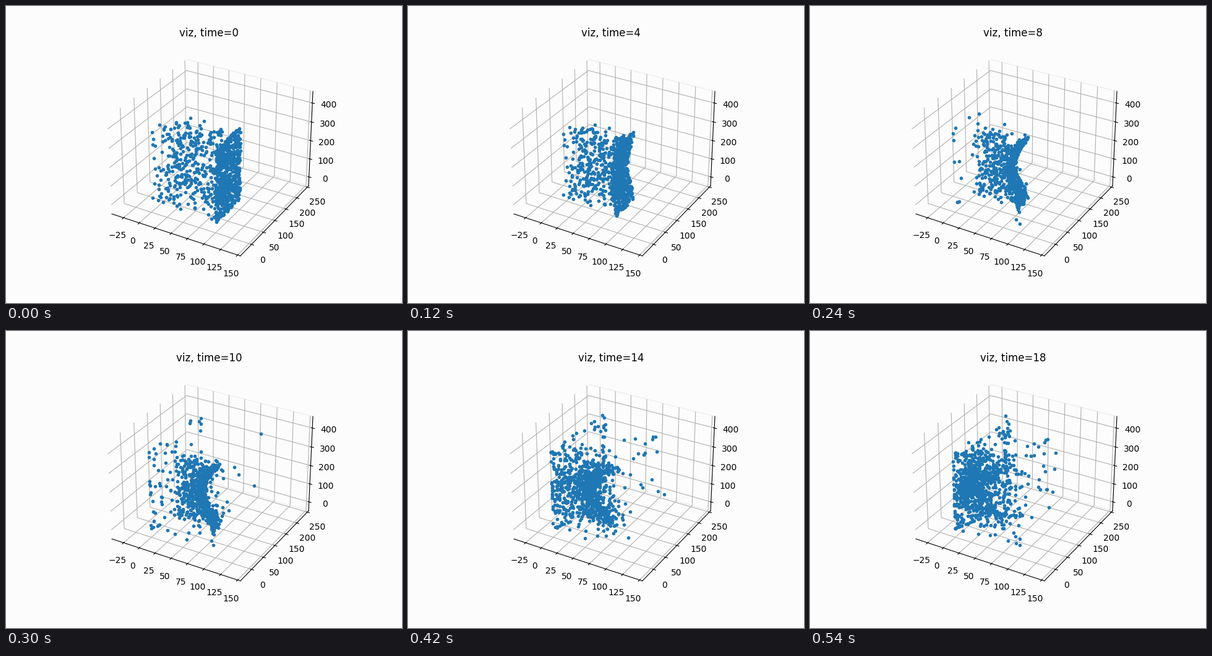
A matplotlib script that plays this animation: 640 by 480 pixels, repeating every 0.57 s.

```python
import numpy as np
import matplotlib.pyplot as plt
from matplotlib.animation import FuncAnimation

STEPS = 19
COUNT = 1000
BOX = np.array([100, 200, 400])
BACKGROUND = "#fcfcfc"

rng = np.random.default_rng(3)


def start_cloud():
    """Loose cloud whose far side is pressed flat against the x wall."""
    x = np.minimum(rng.uniform(0, 238, COUNT), BOX[0])
    y = rng.uniform(0, 100, COUNT)
    z = rng.uniform(4, 392, COUNT)
    return np.column_stack([x, y, z])


def fall(t, pos):
    """Step towards a core that bows to low x, and closeness to that core."""
    x, y, z = pos.T
    middle = np.exp(-((z - 200) / 150) ** 2)
    gap = 95 - middle * (13 + 3.6 * t) - x
    vx = np.where(gap < 0, 4.4, 2.2) * np.tanh(gap / 16)
    vy = (2.6 + 1.6 * middle) * np.tanh((50 - y) / 12)
    vz = 3.5 * np.tanh((200 - z) / 110)
    near = np.exp(-(gap / 30) ** 2 - ((y - 50) / 30) ** 2)
    return np.column_stack([vx, vy, vz]), near


def throws(t, near):
    """Heavy-tailed random throws, frequent once the core is dense."""
    way = rng.normal(size=(COUNT, 3))
    way /= np.linalg.norm(way, axis=1, keepdims=True)
    way += [-0.5, -0.25, 0]
    chance = 0.17 * near / (1 + np.exp((11 - t) / 1.5))
    size = 50 * (chance / rng.uniform(0.001, 1, COUNT)) ** 1.6
    return way * np.minimum(size, 350)[:, None]


def simulate():
    pos = start_cloud()
    track = [pos]
    for t in range(1, STEPS):
        move, near = fall(t, pos)
        pos = np.clip(pos + move + throws(t, near), 0, BOX)
        track.append(pos)
    return track


def padded(low, high):
    pad = (high - low) / 48
    return low - pad, high + pad


track = simulate()

fig = plt.figure(figsize=(6.4, 4.8), dpi=100, facecolor=BACKGROUND)
ax = fig.add_subplot(projection="3d", facecolor=BACKGROUND)
dots, = ax.plot(*track[0].T, linestyle="", marker=".", color="#1f77b4")
title = ax.set_title("viz, time=0")

ax.set_xlim(*padded(-40, 150))
ax.set_ylim(*padded(-40, 250))
ax.set_zlim(*padded(-40, 450))
for axis, edge in ((ax.xaxis, "none"), (ax.yaxis, "#eeeeee"), (ax.zaxis, "none")):
    axis.pane.set(alpha=None, facecolor="none", edgecolor=edge)


def update(t):
    dots.set_data_3d(*track[t].T)
    title.set_text(f"viz, time={t}")
    return dots, title


anim = FuncAnimation(fig, update, frames=STEPS, interval=30, repeat=True,
                     repeat_delay=0, blit=False)
plt.show()
```
